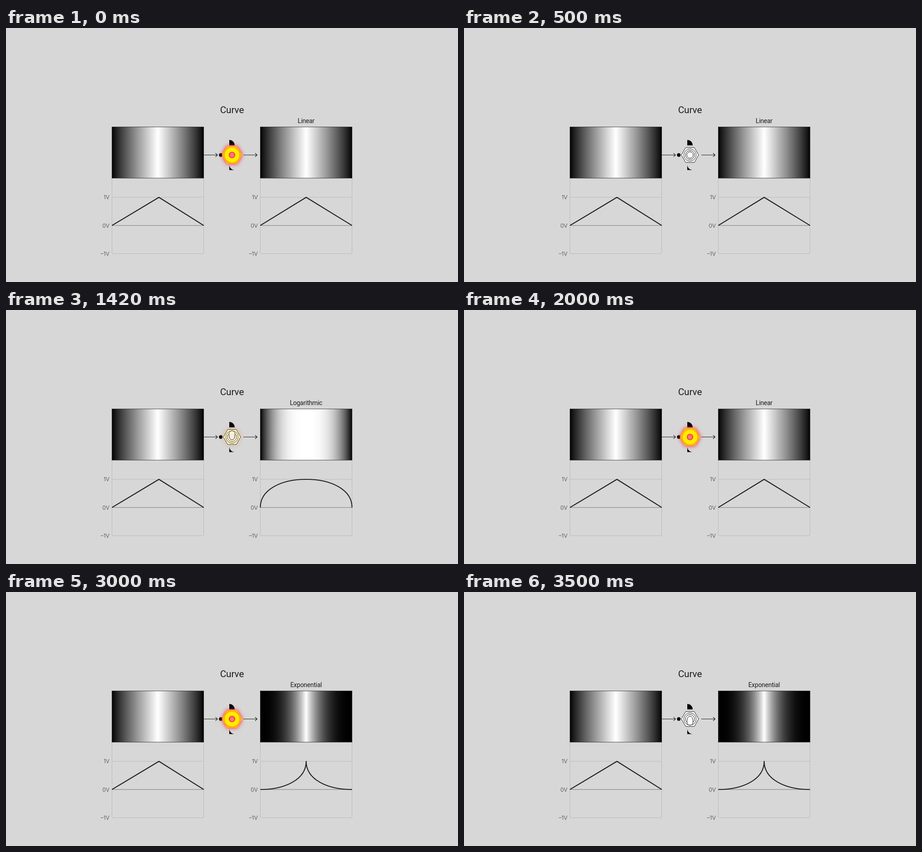
An HTML page that plays this animation: 998x561 px, repeating every 4.04 s.

```html
<!DOCTYPE html>
<html lang="en">
<head>
<meta charset="utf-8">
<title>Curve</title>
<style>
  html, body { margin: 0; width: 100%; height: 100%; overflow: hidden; background: #d7d7d7; }
  svg { display: block; width: 100%; height: 100%; }
  .name { font-family: Roboto, sans-serif; fill: #1c1c1c; text-anchor: middle; }
  .volt { font: 300 12.3px Inter, sans-serif; fill: #3c3c3c; text-anchor: end; }
  .wave { fill: none; stroke: #202020; stroke-width: 2.1; stroke-linejoin: round; }
  .arrow { fill: none; stroke: #202020; stroke-width: 1.2; }
  .part { fill: #fff; stroke: #151515; }
</style>
</head>
<body>
<svg viewBox="0 0 998 561">
  <defs>
    <filter id="blur" x="-60%" y="-60%" width="220%" height="220%">
      <feGaussianBlur stdDeviation="4.2"/>
    </filter>
  </defs>
  <rect width="998" height="561" fill="#d7d7d7"/>
  <text class="name" x="499" y="188" font-size="20.8" letter-spacing="-.1">Curve</text>
  <text class="name" id="label" x="662.6" y="210.3" font-size="13.9" letter-spacing="-.2"></text>
  <g id="panels"></g>
  <path class="arrow" id="arrows"/>
  <g transform="translate(499 280.5)">
    <circle cx="-24.8" r="3.9"/>
    <path d="M-6 -33.2A12 12 0 0 1 6 -21.3H-6Z"/>
    <path d="M-6 21.3A12 12 0 0 0 6 33.2H-6Z"/>
    <path class="part" id="nut"/>
    <circle class="part" r="13.6"/>
    <circle class="part" r="10"/>
    <path class="part" id="lever"/>
    <g id="flash">
      <path id="glow" fill="#ff2a3c" fill-rule="evenodd" filter="url(#blur)"/>
      <path id="hot" fill="#ffb50f" fill-rule="evenodd"/>
      <path id="ring" fill="#ffec00" stroke="#ff9d0a" stroke-width="1.2" fill-rule="evenodd"/>
      <circle r="6.5" fill="#ff3448" fill-opacity=".45" stroke="#e8322e" stroke-width="1.2"/>
    </g>
  </g>
</svg>
<script>
const LOOP = 4040, HOLD = 1000, FADE = 500;
const WIDTH = 202.5, TOP = 374, ZERO = 436.2, LOW = 498.5;
const LEFT = 234, RIGHT = 561.5;
const STOPS = 48;
const $ = id => document.getElementById(id);
const setPath = (id, d) => $(id).setAttribute("d", d);

const dot = r => `M${-r} 0a${r} ${r} 0 1 0 ${2 * r} 0a${r} ${r} 0 1 0 ${-2 * r} 0Z`;
const hexagon = r => {
  const h = r * .866;
  return `M${-r} 0L${-r / 2} ${-h}H${r / 2}L${r} 0L${r / 2} ${h}H${-r / 2}Z`;
};
const arrow = (from, to) => `M${from} 280.5H${to}m-4.5 -4l4.5 4l-4.5 4`;

// Lever tilted down (dir 1) or up (dir -1).
const tilt = dir => {
  const y = n => n * dir;
  return `M-6.5 ${y(7)}C-6.5 ${y(-1)} -5 ${y(-6.2)} 0 ${y(-6.2)}S6.5 ${y(-1)} 6.5 ${y(7)}` +
    `C6.5 ${y(11)} 4 ${y(13.5)} 0 ${y(13.5)}S-6.5 ${y(11)} -6.5 ${y(7)}Z`;
};

// Rise to a peak and fall back; bend 1 bulges up, -1 sags, 0 is straight.
function wave(x, bend, peak = .5) {
  const mid = x + WIDTH * peak, end = x + WIDTH;
  if (!bend) return `M${x} ${ZERO}L${mid} ${TOP}L${end} ${ZERO}`;
  const reach = WIDTH * .27, lift = (ZERO - TOP) * .645;
  return bend > 0
    ? `M${x} ${ZERO}C${x} ${ZERO - lift} ${mid - reach} ${TOP} ${mid} ${TOP}` +
      `S${end} ${ZERO - lift} ${end} ${ZERO}`
    : `M${x} ${ZERO}C${x + reach} ${ZERO} ${mid} ${TOP + lift} ${mid} ${TOP}` +
      `C${mid} ${TOP + lift} ${end - reach} ${ZERO} ${end} ${ZERO}`;
}

// Brightness from 0 at the edges to 1 in the middle, shaped by a curve.
function gradient(shape) {
  let tags = "";
  for (let i = 0; i <= STOPS; i++) {
    const u = 1 - Math.abs(2 * i / STOPS - 1);
    const v = Math.round(255 * shape(u));
    tags += `<stop offset="${i / STOPS}" stop-color="rgb(${v},${v},${v})"/>`;
  }
  return tags;
}

const linear = { label: "Linear", bend: 0, shape: u => u ** .88, lever: dot(7) };
const logarithmic = { label: "Logarithmic", bend: 1, shape: u => 1 - (1 - u) ** 2.9, lever: tilt(-1) };
const exponential = { label: "Exponential", bend: -1, shape: u => u ** 2.45, lever: tilt(1) };
const modes = [linear, logarithmic, linear, exponential];

function panel(x, id) {
  const end = x + WIDTH;
  const level = (y, text, color) =>
    `<path d="M${x} ${y}H${end}" stroke="${color}"/>
     <text class="volt" x="${x - 5.5}" y="${y + 4.3}">${text}</text>`;
  return `<linearGradient id="${id}Fill"></linearGradient>
    <rect x="${x}" y="218.5" width="${WIDTH}" height="113.2" fill="url(#${id}Fill)" stroke="#222" stroke-width=".8"/>
    <path d="M${x} 332V${LOW}M${end} 332V${LOW}" stroke="#a2a2a2" stroke-dasharray="2.5 2"/>
    ${level(TOP, "1V", "#bababa")}${level(ZERO, "0V", "#777")}${level(LOW, "–1V", "#bababa")}
    <path class="wave" id="${id}Wave"/>`;
}

$("panels").innerHTML = panel(LEFT, "in") + panel(RIGHT, "out");
$("inFill").innerHTML = gradient(linear.shape);
setPath("inWave", wave(LEFT, 0, .512));
setPath("arrows", arrow(437, 467) + arrow(524, 554.5));
setPath("nut", hexagon(19));
setPath("glow", hexagon(23) + dot(6.5));
setPath("hot", hexagon(22.3) + dot(6.5));
setPath("ring", dot(17) + dot(6.5));

let shown;
function show(mode) {
  if (mode === shown) return;
  shown = mode;
  $("label").textContent = mode.label;
  $("outFill").innerHTML = gradient(mode.shape);
  setPath("outWave", wave(RIGHT, mode.bend));
  setPath("lever", mode.lever);
}

function draw(now) {
  const t = now % LOOP;
  const step = Math.min(modes.length - 1, Math.floor(t / HOLD));
  show(modes[step]);
  $("flash").setAttribute("opacity", Math.max(0, 1 - (t - step * HOLD) / FADE));
}

let start;
function tick(now) {
  start ??= now;
  draw(now - start);
  requestAnimationFrame(tick);
}
draw(0);
requestAnimationFrame(tick);
</script>
</body>
</html>
```
